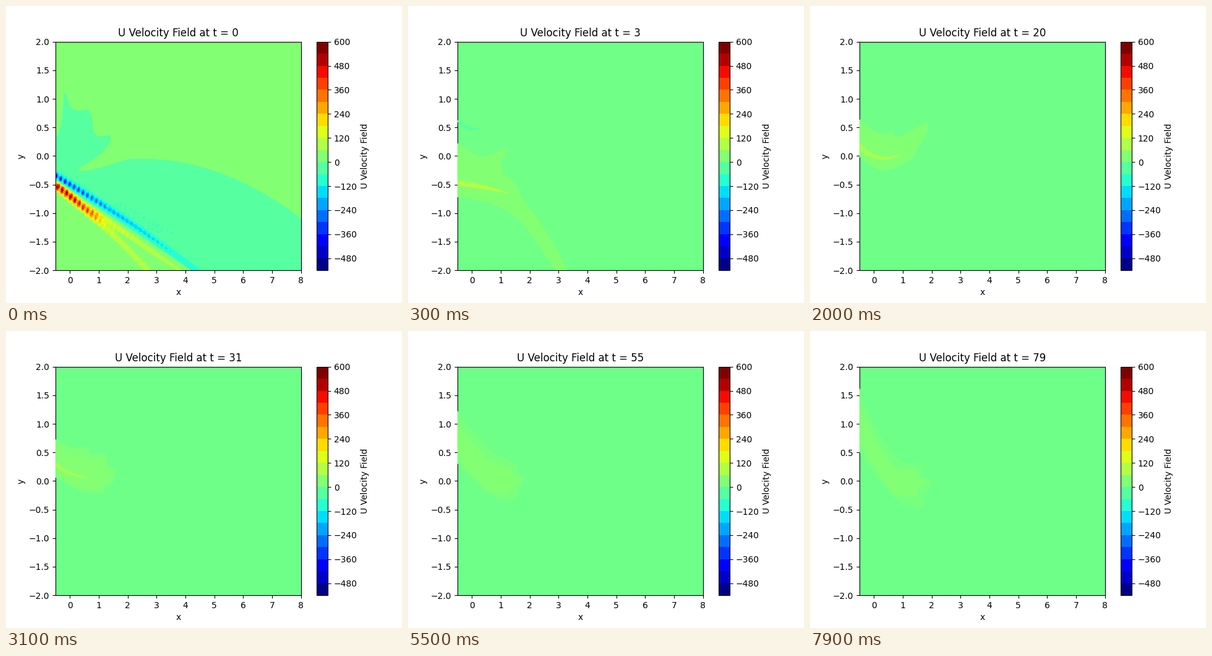
A matplotlib script for the animation above (8000 ms loop, 640x480 px).

```python
import numpy as np
import matplotlib.pyplot as plt
from matplotlib.animation import FuncAnimation
from matplotlib.cm import ScalarMappable
from matplotlib.collections import LineCollection
from matplotlib.colors import BoundaryNorm, ListedColormap, to_rgb

FRAMES = 80
LEVELS = np.arange(-540, 601, 60)
BANDS = plt.cm.jet(np.clip((LEVELS[:-1] + 550) / 1080, 0, 1))
rng = np.random.default_rng(4)


def to_data(p):
    """Stage pixels (y down) to axes data."""
    return (np.asarray(p, float) - [80, 242.4]) / [46.682, -92.4] + [-0.5, 0]


def smooth(p, rounds=2):
    """Corner cutting that keeps both ends."""
    p = np.asarray(p, float)
    for _ in range(rounds):
        a, b = p[:-1], p[1:]
        cut = np.stack([0.8 * a + 0.2 * b, 0.2 * a + 0.8 * b], 1).reshape(-1, 2)
        p = np.vstack([p[:1], cut, p[-1:]])
    return p


def resample(p, n):
    s = np.r_[0, np.cumsum(np.hypot(*np.diff(p, axis=0).T))]
    u = np.linspace(0, s[-1], n)
    return np.column_stack([np.interp(u, s, c) for c in p.T])


def keyed(n, *shapes):
    return np.array([resample(smooth(s), n) for s in shapes])


def colors(*names):
    return np.array([to_rgb("#" + c) for c in names])


def ribbon(line, half):
    """Outline of a band around a line, half a scalar or one value per point."""
    d = np.gradient(line, axis=0)
    d /= np.hypot(*d.T)[:, None]
    off = d[:, ::-1] * [-1, 1] * np.broadcast_to(half, len(line))[:, None]
    return np.vstack([line - off, (line + off)[::-1]])


KEYS = [3, 11, 31, 79]


def at(stack, t):
    """Value at time t; the last, slow stage eases out a little."""
    t = np.clip(t, KEYS[0], KEYS[-1])
    i = min(np.searchsorted(KEYS, t, side="right") - 1, len(KEYS) - 2)
    f = (t - KEYS[i]) / (KEYS[i + 1] - KEYS[i])
    if i == 2:
        f **= 0.85
    return (1 - f) * stack[i] + f * stack[i + 1]


# Plume outlines, from the upper left edge round to the lower left edge
falling = [(80, 222), (105, 239), (122, 245), (145, 236), (165, 226), (147, 257),
           (155, 263), (153, 272), (177, 287), (183, 311), (212, 345), (261, 430),
           (239, 430), (208, 380), (175, 340), (140, 321), (100, 310), (80, 309)]
cup = [(80, 190), (102, 213), (122, 220), (143, 214), (136, 228), (155, 219),
       (183, 194), (207, 152), (198, 180), (174, 232), (146, 267), (120, 277),
       (95, 266), (80, 250)]
lobed = [(80, 175), (105, 189), (134, 187), (135, 202), (162, 195), (165, 221),
         (180, 222), (174, 247), (160, 252), (160, 263), (130, 261), (108, 254),
         (94, 244), (80, 237)]
rising = [(80, 92), (95, 135), (120, 180), (150, 214), (186, 212), (180, 238),
          (197, 236), (195, 252), (184, 262), (184, 287), (155, 284), (130, 266),
          (100, 226), (80, 196)]
outer = keyed(200, falling, cup, lobed, rising)
core = keyed(60,
             [(80, 286), (105, 290), (130, 294), (163, 303)],
             [(80, 234), (90, 247), (107, 256), (130, 258), (160, 244)],
             [(80, 215), (95, 227), (112, 233), (133, 237)],
             [(80, 160), (105, 200), (140, 240)])
core_width = np.array([4.5, 5.5, 3.2, -1])
heart_scale = np.array([1, 1, 0.72, 0.6])
fleck_alpha = np.array([0.9, 0.6, 0, 0])
ground_rgb = colors("70ff87", "6fff88", "6eff89", "6eff89")
outer_rgb = colors("83ff73", "82ff74", "7dff7a", "77ff80")
inner_rgb = colors("83ff73", "82ff74", "84ff73", "82ff75")
core_rgb = colors("a8ff50", "9cff5b", "a3ff54", "86ff70")

fig, ax = plt.subplots(figsize=(6.4, 4.8), dpi=100)
bar = fig.colorbar(ScalarMappable(BoundaryNorm(LEVELS, len(BANDS)), ListedColormap(BANDS)),
                   ax=ax, ticks=np.arange(-480, 601, 120), label="U Velocity Field",
                   spacing="proportional")
bar.minorticks_off()


def patch(points, color, z):
    return ax.fill(*to_data(points).T, color=color, lw=0, zorder=z)[0]


def lines(segments, color, z):
    return ax.add_collection(LineCollection(segments, colors=[color],
                                            linewidths=1.1, zorder=z))


# Opening jet: a smooth negative zone, then banded ridges
horn = [(80, 215), (89, 193), (92, 165), (95.5, 134), (103, 165), (118, 170),
        (133, 166), (139, 180), (141, 206), (150, 211), (168, 208), (170, 216),
        (158, 235), (137, 251), (113, 264), (126, 267), (155, 261)]
arc_x = np.linspace(195, 478, 30)
arc = np.column_stack([arc_x, 247 + 0.00148 * (arc_x - 222) ** 2])
zone = patch(np.vstack([smooth(horn), arc, [(478, 428), (302, 428), (80, 281)]]),
             BANDS[8], 1)

px, py = np.meshgrid(np.arange(79, 330, 0.75), np.arange(255, 430, 0.75))
dx = px - 79


def ridge(y, amp, sigma):
    return amp * np.exp(-(0.82 * (py - y) / sigma) ** 2)


jet = ridge(274 + 0.67 * dx - 5 * np.sin(dx / 73), -360 * np.exp(-dx / 170), 5.8)
jet += ridge(288 + 0.75 * dx + 0.0012 * dx ** 2,
             95 + 280 / (1 + np.exp((px - 138) / 12)), 7)
jet += ridge(320 + 0.69 * (px - 125),
             np.clip((px - 125) / 20, 0, 1) * (150 - 0.55 * (px - 125)), 5)
rough = np.interp(px, [80, 140, 165, 300], [0.42, 0.36, 0.2, 0.06])
beads = 1 + rough * (np.sin(0.72 * px + 0.25 * py)
                     + 0.6 * np.sin(1.3 * px - 0.9 * py) * np.sin(0.31 * px + 0.8 * py))
grid = to_data(np.dstack([px, py]))
shades = BANDS.copy()
shades[8:10, 3] = 0
bands = ax.contourf(grid[..., 0], grid[..., 1], np.clip(jet * beads, -530, 590),
                    levels=LEVELS, colors=list(shades), zorder=2)

# Ripples above the jet
dashes = []
for row in range(4):
    for x in np.arange(160 + 8 * row, 235 + 11 * row, 7.5):
        x += rng.uniform(-1.5, 1.5)
        y = 322 + 0.56 * (x - 160) - 5.5 * row + rng.uniform(-1, 1)
        size = rng.uniform(1.5, 4)
        dashes.append(to_data([(x, y), (x + size, y + 0.6 * size)]))
opening = [zone, bands, lines(dashes, BANDS[7], 2)]

# Later plume
body, heart, spine = (patch(outer[0], "w", z) for z in (3, 4, 5))
flecks = lines([], "#d0ff27", 6)
fleck_at = np.arange(3, 48, 2)
fleck_len = rng.uniform(0.2, 0.8, len(fleck_at))


def streak(points, half, color, z):
    line = resample(smooth(points), 30)
    return patch(ribbon(line, half * np.sin(np.linspace(0.3, np.pi - 0.2, 30))), color, z)


sliver = streak([(79, 185), (97, 199), (117, 198)], 3, "#58ff9e", 3)
arms = [streak([(138, 220), (175, 182), (216, 112)], 10, "#78ff7f", 2),
        streak([(145, 214), (162, 176)], 5, "#78ff7f", 2),
        streak([(205, 160), (231, 108)], 4, "#76ff81", 2),
        streak([(186, 198), (207, 155)], 3, "#98ff5e", 5)]
plume = [body, heart, spine, flecks, sliver, *arms]

ax.set(xlim=(-0.5, 8), ylim=(-2, 2), xlabel="x", ylabel="y",
       xticks=range(9), yticks=np.arange(-2, 2.1, 0.5))
title = ax.set_title("")


def update(n):
    title.set_text(f"U Velocity Field at t = {n}")
    for art in opening:
        art.set_visible(n == 0)
    for art in plume:
        art.set_visible(n > 0)
    if n == 0:
        ax.set_facecolor(BANDS[9])
        return
    ax.set_facecolor(at(ground_rgb, n))
    edge, line = at(outer, n), at(core, n)
    body.set_xy(to_data(edge))
    body.set_color(at(outer_rgb, n))

    # The brighter heart is the outline drawn in towards the core line
    k = at(heart_scale, n)
    axis = np.interp(edge[:, 0], *line.T)
    heart.set_xy(to_data(np.column_stack([80 + (edge[:, 0] - 80) * (0.75 + 0.25 * k),
                                          axis + (edge[:, 1] - axis) * k])))
    heart.set_color(at(inner_rgb, n))

    half = max(0.5, at(core_width, n)) * (1 + 0.25 * max(0, 3 - n))
    taper = half * np.sqrt(np.linspace(1, 0, len(line)))
    spine.set_xy(to_data(ribbon(line, taper)))
    spine.set_color(at(core_rgb, n))

    mid = line[fleck_at]
    reach = np.outer(taper[fleck_at] * fleck_len, [0, 1])
    flecks.set_segments(to_data(np.stack([mid - reach, mid + reach], 1)))
    flecks.set_alpha(float(at(fleck_alpha, n)))

    sliver.set_alpha(float(np.clip(1 - (n - 3) / 3, 0, 1)))
    for arm in arms:
        arm.set_alpha(max(0, 1 - abs(n - 11) / 6))


anim = FuncAnimation(fig, update, frames=FRAMES, init_func=lambda: update(0),
                     interval=100, repeat=True, repeat_delay=0, blit=False)
plt.show()
```
